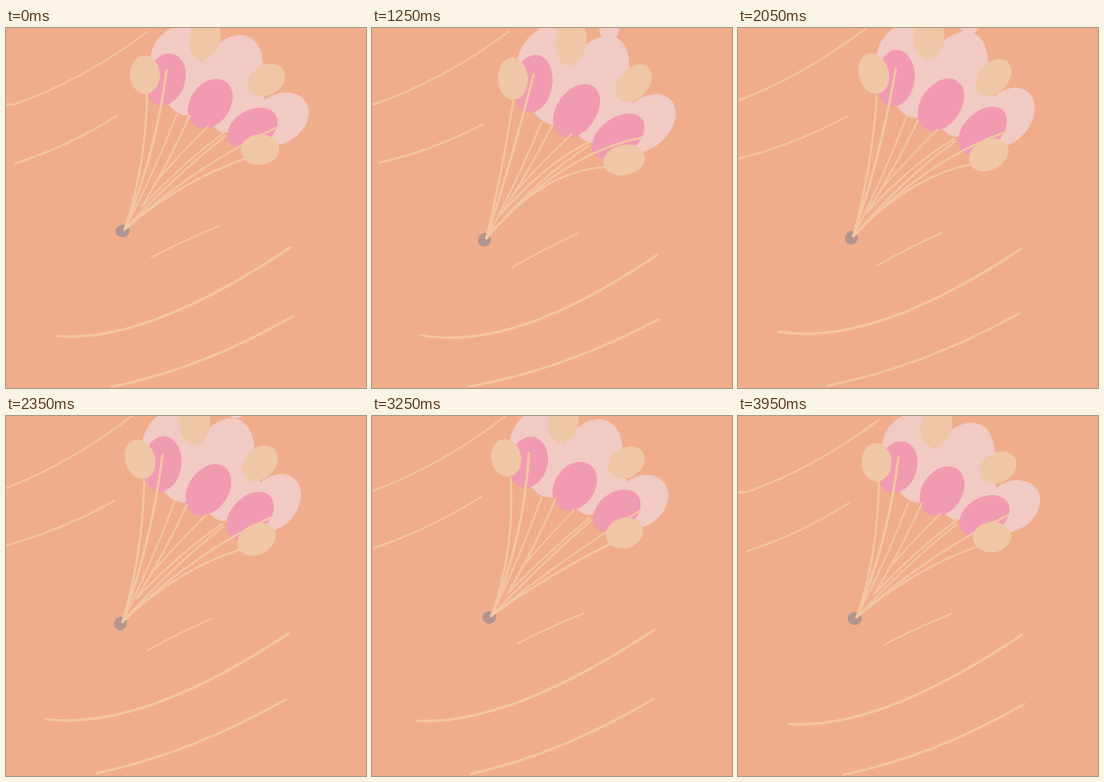
These frames come from a looping animation (360x360 px, 4000 ms). An HTML page:

```html
<!DOCTYPE html>
<html lang="en">
<head>
<meta charset="utf-8">
<title>Drifting balloons</title>
<style>
  html, body { margin: 0; width: 100%; height: 100%; overflow: hidden; background: #f0ad8b; }
  svg { display: block; width: 100%; height: 100%; }
  path { fill: none; stroke: #f2c7a2; stroke-linecap: round; stroke-linejoin: round; }
</style>
</head>
<body>
<svg id="stage" viewBox="0 0 360 360"></svg>
<script>
const LOOP = 4000, STEP = 50;
const PALE = '#f2cac4', PINK = '#f29ab1', TAN = '#f0c7a6';
const stage = document.getElementById('stage');
let now = 0;

function add(tag, attrs) {
  const node = document.createElementNS('http://www.w3.org/2000/svg', tag);
  stage.append(node);
  return set(node, attrs);
}
function set(node, attrs) {
  for (const key in attrs) node.setAttribute(key, attrs[key]);
  return node;
}

// A value swinging around its mean; peak is the time (ms) of its maximum.
const wave = (mean, amp = 0, peak = 0) =>
  mean + amp * Math.cos(2 * Math.PI * (now - peak) / LOOP);
const at = ([x, y]) => [wave(...x), wave(...y)];

// Points are [x wave, y wave].
const knot = [[114.9, 2.6, 3450], [206.5, 5.5, 1450]];
const knotTop = [[116.9, 2.6, 3450], [205, 5.5, 1450]];
const tie = [[132.5, 4.5, 3650], [181.5, 5, 1450]];
const upperTie = [[147, 3, 3700], [157, 5, 1400]];

const winds = [
  { from: [[2, 7, 350], [75.5, 1.5, 500]], to: [[135, 8, 450], [2, 3, 500]], bend: [[2], [12]], width: 1.8, lead: true },
  { from: [[4.5, 6.5, 500], [133.3, 3.3, 550]], to: [[110, 1.8, 700], [88.5, 8, 1050]], bend: [[2], [7]], width: 1.8 },
  { from: [[142.7, 3.7, 3600], [233.5, 6.5, 1450]], to: [[209, 5, 3800], [201.3, 4.6, 1550]], bend: [[0], [-2]], width: 1.6 },
  { from: [[46.5, 6.8, 450], [306, 3, 500]], to: [[283.5, 1.6, 750], [220.5, 7, 1100]], bend: [[-26], [54, 4, 1500]], width: 2.4 },
  { from: [[98, 8, 150], [358.2, 0.8, 500]], to: [[284.2, 4.5, 600], [287, 5.2, 850]], bend: [[0], [17]], width: 2.2 }
];

// Balloons, back to front: rx across, ry along, turn in degrees.
const balloons = [
  { fill: PALE, pos: [[174, 5, 450], [-6, 8, 850]], rx: 9, ry: 9, turn: [0] },
  { fill: PALE, pos: [[234, 5, 700], [-7, 8, 1300]], rx: 10, ry: 10, turn: [0] },
  { fill: PALE, pos: [[167.5, 6, 680], [28, 4.5, 950]], rx: 25, ry: 32, turn: [25] },
  { fill: PALE, pos: [[180, 3, 600], [58, 6, 1050]], rx: 25, ry: 31, turn: [0] },
  { fill: PALE, pos: [[218.5, 4.5, 550], [52.5, 4.8, 1050]], rx: 31, ry: 50, turn: [25, 4, 550] },
  { fill: PALE, pos: [[237, 3, 700], [74, 6, 1050]], rx: 22, ry: 20, turn: [40] },
  { fill: PALE, pos: [[219, 1.5, 700], [84, 6.5, 1150]], rx: 18, ry: 23, turn: [0] },
  { fill: PALE, pos: [[271, 4.7, 650], [90.5, 5.5, 950]], rx: 24, ry: 32.5, turn: [49, 8, 100] },
  { fill: TAN, pos: [[195, 7, 640], [9.5, 4.8, 900]], rx: 15.5, ry: 23, turn: [8, 6, 0] },
  { fill: TAN, pos: [[258, 5.2, 720], [51, 5.3, 880]], rx: 15, ry: 20.5, turn: [51, 11, 3700] },
  { fill: PINK, pos: [[158.5, 3.2, 780], [51, 5.3, 950]], rx: 19.5, ry: 27.5, turn: [12, 6, 0] },
  { fill: PINK, pos: [[203.6, 1.4, 700], [76.5, 6.5, 1080]], rx: 20, ry: 28, turn: [35] },
  { fill: PINK, pos: [[245.5, 1.5, 550], [102, 6.8, 1130]], rx: 18.7, ry: 28, turn: [53, 8, 300] },
  { fill: TAN, pos: [[137.5, 4.5, 800], [46.3, 5, 950]], rx: 15, ry: 20, turn: [-8, 10, 600] },
  { fill: TAN, pos: [[252.3, 1.8, 200], [124.5, 7.5, 1250]], rx: 15.2, ry: 20, turn: [75, 13, 400] }
];

// Strings sag most when the cluster is lowest.
const tight = [[0], [-9, 5, 3250]];
const loose = [[-3], [-20, 15, 3250]];
const upright = [[8, 6, 3250], [4]];
const strings = [
  { from: knotTop, to: [[140, 2, 700], [67.5, 6, 1150]], bend: upright, width: 2.1 },
  { from: knotTop, to: [[159.3, 3.4, 750], [41.5, 5, 950]], bend: upright, width: 2.3 },
  { from: knotTop, to: [[169.5, 1, 200], [88, 6.5, 1100]], bend: [[3], [2]], width: 1.8 },
  { from: tie, to: [[182, 2, 3700], [90, 6.5, 1250]], bend: [[2], [3]], width: 1.9 },
  { from: upperTie, to: [[201, 1.5, 3700], [100, 6, 1200]], bend: [[0], [-2]], width: 1.7 },
  { from: tie, to: [[217, 1.3, 3800], [108, 6.5, 1350]], bend: tight, width: 1.8 },
  { from: knotTop, to: [[218, 1.3, 3800], [111, 6.5, 1300]], bend: tight, width: 1.8 },
  { from: knotTop, to: [[269.3, 2, 650], [102, 7.5, 1200]], bend: loose, width: 2 },
  { from: knotTop, to: [[239, 2, 0], [133, 6, 1300]], bend: loose, width: 2 }
];

function curve([x1, y1], [x2, y2], [dx, dy]) {
  const cx = (x1 + x2) / 2 + dx, cy = (y1 + y2) / 2 + dy;
  return `M${x1} ${y1}Q${cx} ${cy} ${x2} ${y2}`;
}

for (const wind of winds) wind.node = add('path', { 'stroke-width': wind.width });
for (const balloon of balloons) balloon.node = add('ellipse', { fill: balloon.fill, rx: balloon.rx });
const knotNode = add('ellipse', { fill: '#b3948f', rx: 7, ry: 6.3 });
for (const string of strings) string.node = add('path', { 'stroke-width': string.width });

function draw(time) {
  now = Math.floor(time % LOOP / STEP) * STEP;
  for (const { node, from, to, bend, lead } of [...winds, ...strings]) {
    const start = at(from);
    const d = curve(start, at(to), at(bend));
    set(node, { d: lead ? `M-6 ${start[1]}L${d.slice(1)}` : d });
  }
  const stretch = wave(1, 0.06, 1400);
  for (const { node, pos, ry, turn } of balloons) {
    const [x, y] = at(pos);
    set(node, { ry: ry * stretch, transform: `translate(${x} ${y}) rotate(${wave(...turn)})` });
  }
  const [x, y] = at(knot);
  set(knotNode, { transform: `translate(${x} ${y}) rotate(${wave(-40, 40, 3800)})` });
}

const begin = performance.now();
function tick() {
  draw(performance.now() - begin);
  requestAnimationFrame(tick);
}
draw(0);
requestAnimationFrame(tick);
</script>
</body>
</html>
```
